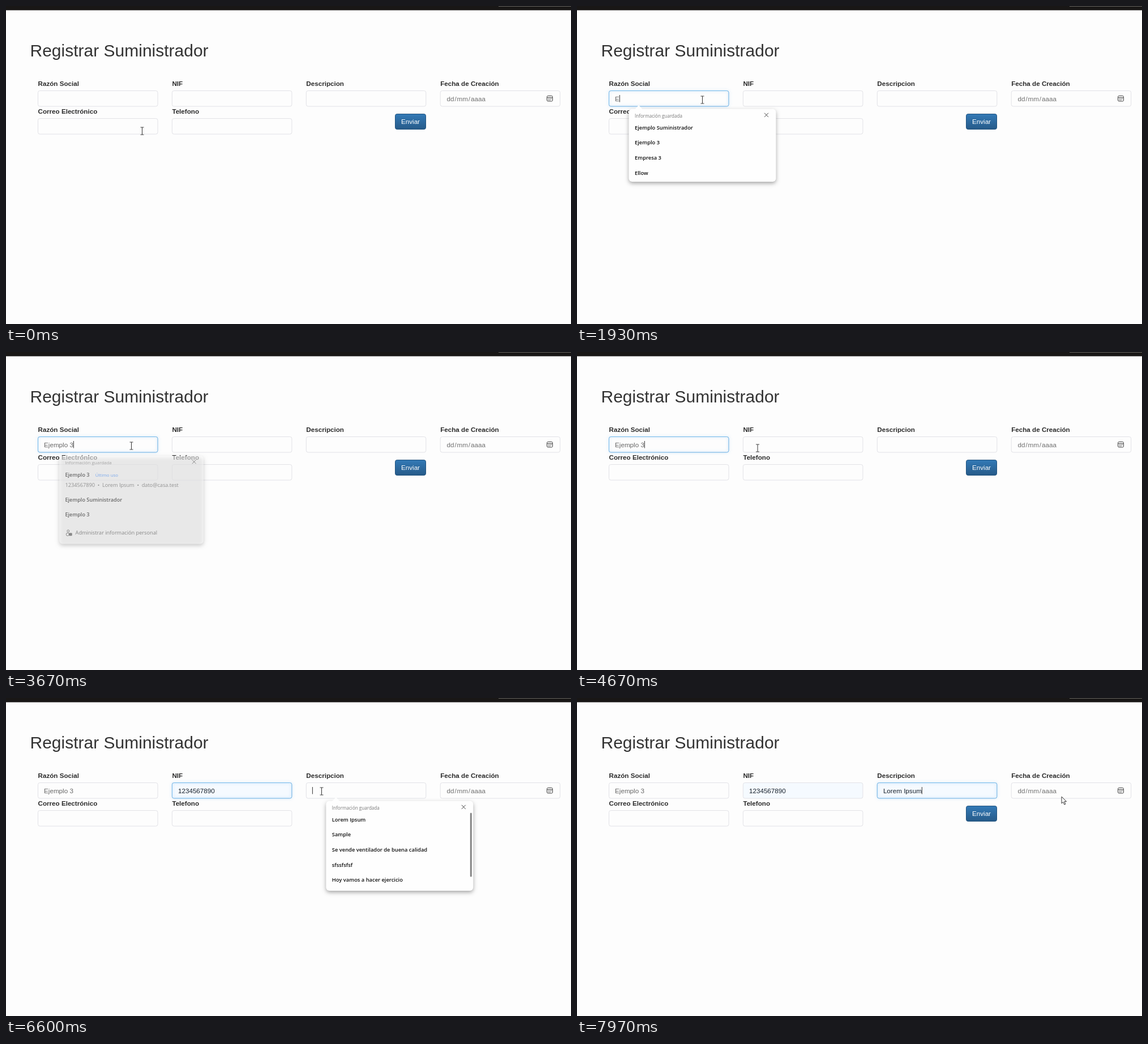
These frames come from a looping animation (998x561 px, 8 s). An HTML page with a canvas:

```html
<!DOCTYPE html>
<html lang="es">
<head>
<meta charset="utf-8">
<title>Registrar Suministrador</title>
<style>
  html, body { margin: 0; width: 100%; height: 100%; overflow: hidden; background: #fdfdfd; }
  canvas { display: block; width: 100vw; height: 100vh; }
</style>
</head>
<body>
<canvas width="998" height="561"></canvas>
<script>
const ctx = document.querySelector('canvas').getContext('2d');
const LOOP = 8000;
const ARIAL = '"Liberation Sans", Arial, sans-serif';
const UI = '"Open Sans", "Noto Sans", sans-serif';
const BODY = `11.65px ${ARIAL}`;
const PREVIEW = `11.1px ${ARIAL}`;
const LABEL = `bold 11.65px ${ARIAL}`;
const ITEM = `600 9.35px ${UI}`;
const SMALL = `8.1px ${UI}`;
const DETAIL = `9.4px ${UI}`;

const FIELD_W = 212, FIELD_H = 28, BLINK = 500, CLOSE = 100;
const columnX = col => 56.5 + 236.9 * col;

// from/to: focus; filled: autofill accepted
const fields = [
  { label: 'Razón Social', col: 0, row: 0, from: 600, to: 5100 },
  { label: 'NIF', col: 1, row: 0, from: 5100, to: 6570, value: '1234567890', filled: 5800 },
  { label: 'Descripcion', col: 2, row: 0, from: 6570, to: LOOP + 500, value: 'Lorem Ipsum', filled: 7480 },
  { label: 'Fecha de Creación', col: 3, row: 0, date: true },
  { label: 'Correo Electrónico', col: 0, row: 1 },
  { label: 'Telefono', col: 1, row: 1 },
];
for (const f of fields) {
  f.x = columnX(f.col);
  f.y = 149.5 + 49 * f.row;
}

const typed = 'Ejemplo 3';
const keyTimes = [1490, 2150, 2320, 2460, 2600, 2790, 2980, 3340, 3640];

const companies = ['Ejemplo Suministrador', 'Ejemplo 3', 'Empresa 3', 'Ellow'];
const popups = [
  { col: 0, from: 620, to: 1490, swap: true, bottom: 340, scroll: true, rows: [...companies, 'Sample'] },
  { col: 0, from: 1490, to: 2150, swap: true, bottom: 310, rows: companies },
  { col: 0, from: 2150, to: 3630, bottom: 340, profile: true, rows: [] },
  { col: 1, from: 5130, to: 5800, bottom: 340, scroll: true,
    rows: ['1234567890', '05040302', '00000000', '09090909', '0123456789'] },
  { col: 2, from: 6570, to: 7480, bottom: 340, scroll: true,
    rows: ['Lorem Ipsum', 'Sample', 'Se vende ventilador de buena calidad', 'sfssfsfsf', 'Hoy vamos a hacer ejercicio'] },
];

// time, x, y
const pointerPath = [
  [0, 240.5, 220.5], [60, 240.5, 220.5], [520, 221.5, 165.5], [4430, 221.5, 165.5],
  [4730, 330, 170], [4970, 330, 170], [5080, 365, 165], [5180, 365, 165],
  [5450, 374.5, 220], [5830, 374.5, 220], [6400, 557.5, 164.5], [6680, 557.5, 164.5],
  [7150, 633.5, 204], [7500, 633.5, 204], [7940, 856, 174], [LOOP, 856, 174],
];

const clamp = v => Math.max(0, Math.min(1, v));
const ramp = (t, start, length) => clamp((t - start) / length);
const smooth = p => p * p * (3 - 2 * p);

function pointerAt(t) {
  const i = pointerPath.findIndex(k => k[0] > t);
  const [t0, x0, y0] = pointerPath[i - 1], [t1, x1, y1] = pointerPath[i];
  const p = smooth((t - t0) / (t1 - t0));
  return { x: x0 + (x1 - x0) * p, y: y0 + (y1 - y0) * p };
}

const inside = (p, x, y, w, h) => p.x >= x && p.x < x + w && p.y >= y && p.y < y + h;

function text(string, x, y, font, color) {
  ctx.font = font;
  ctx.fillStyle = color;
  ctx.fillText(string, x, y);
}

function box(x, y, w, h, r, fill, stroke) {
  ctx.beginPath();
  ctx.roundRect(x, y, w, h, r);
  if (fill) { ctx.fillStyle = fill; ctx.fill(); }
  if (stroke) { ctx.strokeStyle = stroke; ctx.lineWidth = 1; ctx.stroke(); }
}

function polyline(points, color, width = 1) {
  ctx.beginPath();
  points.forEach(([x, y]) => ctx.lineTo(x, y));
  ctx.strokeStyle = color;
  ctx.lineWidth = width;
  ctx.stroke();
}

function polygon(points, fill, stroke) {
  ctx.beginPath();
  points.forEach(([x, y]) => ctx.lineTo(x, y));
  ctx.closePath();
  ctx.fillStyle = fill;
  ctx.fill();
  if (stroke) { ctx.strokeStyle = stroke; ctx.lineWidth = 1; ctx.stroke(); }
}

function drawPage() {
  ctx.fillStyle = '#fdfdfd';
  ctx.fillRect(0, 0, 998, 561);
  ctx.fillStyle = '#191716';
  ctx.fillRect(0, 0, 998, 7.5);
  ctx.fillStyle = '#66645f';
  ctx.fillRect(870, 0, 128, 1);
  text('Registrar Suministrador', 42.5, 88.5, `30px ${ARIAL}`, '#333');

  const shade = ctx.createLinearGradient(0, 190, 0, 218);
  shade.addColorStop(0, '#337ab7');
  shade.addColorStop(1, '#265a88');
  box(687.5, 190.5, 54, 27, 3.3, shade, '#245580');
  text('Enviar', 698, 208, BODY, '#fff');
}

function drawDate() {
  [['dd', 778.5], ['/', 792.5], ['mm', 796.5], ['/', 816.8], ['aaaa', 821]]
    .forEach(([part, x]) => text(part, x, 167.5, BODY, '#707070'));
  box(955.5, 158.5, 10, 9.5, 2, null, '#444');
  polyline([[955.5, 161.5], [965.5, 161.5]], '#444');
  ctx.fillStyle = '#555';
  for (let i = 0; i < 5; i++) ctx.fillRect(957.5 + 2.5 * (i % 3), 163 + 2.3 * Math.floor(i / 3), 1.4, 1.3);
}

function drawField(f, t, previewing) {
  text(f.label, f.x, f.y - 8.5, LABEL, '#2b2b2b');
  const focus = f.from ? ramp(t, f.from + 30, 150) - ramp(t, f.to + 30, 150) : 0;
  const accepted = f.filled && t >= f.filled;
  const tinted = accepted || previewing;
  box(f.x, f.y, FIELD_W - .5, FIELD_H - .5, 3.3, tinted ? '#f5faff' : '#fdfdfd', '#e2e2e7');
  if (focus > 0) {
    ctx.save();
    ctx.globalAlpha = focus;
    ctx.shadowColor = 'rgba(102,175,233,.6)';
    ctx.shadowBlur = 5;
    box(f.x, f.y, FIELD_W - .5, FIELD_H - .5, 3.3, null, '#72b9ec');
    ctx.restore();
  }
  if (f.date) return drawDate();

  const keys = f.col === 0 && f.row === 0 ? keyTimes.filter(k => k <= t) : [];
  const value = accepted || previewing ? f.value : typed.slice(0, keys.length);
  const left = f.x + 10.6, base = f.y + 18;
  text(value, left, base, previewing ? PREVIEW : BODY, tinted ? '#17202b' : '#666');

  if (t >= f.from && t < f.to) {
    const lastInput = Math.max(f.from, accepted ? f.filled : 0, ...keys);
    if (Math.floor((t - lastInput) / BLINK) % 2 === 0) {
      const width = previewing ? 0 : ctx.measureText(value).width;
      ctx.fillStyle = '#333';
      ctx.fillRect(left + width, f.y + 7.5, 1, 12.5);
    }
  }
}

const popupLeft = p => columnX(p.col) + 35;
const rowTop = i => 201 + 26.6 * i;
const hovers = (p, i, pointer) => inside(pointer, popupLeft(p), rowTop(i), 250, 26.6);

function drawProfile(x) {
  text('Ejemplo 3', x, 219.3, ITEM, '#111');
  text('Último uso', x + 54.5, 219.3, SMALL, '#2f7df0');
  text('1234567890  •  Lorem Ipsum  •  dato@casa.test', x, 238, DETAIL, '#555');
  text('Ejemplo Suministrador', x, 264.5, ITEM, '#111');
  text('Ejemplo 3', x, 291, ITEM, '#111');
  box(x + 3.5, 315, 4, 4, 2, null, '#444');
  box(x + 2, 320.5, 5, 5, 2, null, '#444');
  box(x + 7, 320.5, 5.5, 5, 1, '#444');
  text('Administrar información personal', x + 18.5, 323.5, DETAIL, '#444');
}

function drawPopup(p, t, pointer) {
  const closing = ramp(t, p.to, CLOSE);
  const left = popupLeft(p), top = 181.5, width = 260, height = p.bottom - top;
  const cx = left + width / 2, cy = top + height / 2, x = left + 10.5;
  ctx.save();
  ctx.globalAlpha = 1 - closing;
  ctx.translate(cx, cy);
  ctx.scale(1 - .05 * closing, 1 - .05 * closing);
  ctx.translate(-cx, -cy);

  ctx.save();
  ctx.shadowColor = 'rgba(0,0,0,.34)';
  ctx.shadowBlur = 7;
  ctx.shadowOffsetY = 3;
  box(left, top, width, height, 6, '#fefefe');
  ctx.restore();
  polygon([[left + 11, top + .5], [left + 17.5, top - 6.5], [left + 24, top + .5]], '#fefefe');

  text('Información guardada', x, 196.8, SMALL, '#777');
  const mx = left + 243, my = 192.3;
  polyline([[mx - 3.5, my - 3.5], [mx + 3.5, my + 3.5]], '#444');
  polyline([[mx + 3.5, my - 3.5], [mx - 3.5, my + 3.5]], '#444');

  p.rows.forEach((row, i) => {
    if (hovers(p, i, pointer)) box(left + 4, rowTop(i), 245, 26, 2, '#f4f4f5');
    text(row, x, rowTop(i) + 16.8, ITEM, '#111');
  });
  if (p.profile) drawProfile(x);
  if (p.scroll) box(left + 254.5, 202.5, 3, 113, 1.5, '#858585');
  ctx.restore();
}

function drawPointer({ x, y }) {
  const overText = fields.some(f => !f.date && inside({ x, y }, f.x, f.y, FIELD_W, FIELD_H));
  const at = points => points.map(([dx, dy]) => [x + dx, y + dy]);
  if (overText) {
    polyline(at([[0, -6.5], [0, 6.5]]), '#333');
    for (const end of [-6.5, 6.5]) polyline(at([[-3, end], [3, end]]), '#444');
  } else {
    polygon(at([[0, 0], [0, 12], [2.8, 9.4], [4.8, 14], [6.8, 13.2], [4.8, 8.7], [8.5, 8.7]]), '#fff', '#333');
  }
}

function draw(t) {
  const pointer = pointerAt(t);
  const open = popups.filter(p => t >= p.from && t < p.to + (p.swap ? 0 : CLOSE));
  drawPage();
  for (const f of fields) {
    const previewing = f.value && open.some(p => p.col === f.col && t < p.to && hovers(p, 0, pointer));
    drawField(f, t, previewing);
  }
  open.forEach(p => drawPopup(p, t, pointer));
  drawPointer(pointer);
}

const start = performance.now();
function tick() {
  draw((performance.now() - start) % LOOP);
  requestAnimationFrame(tick);
}
tick();
</script>
</body>
</html>
```
